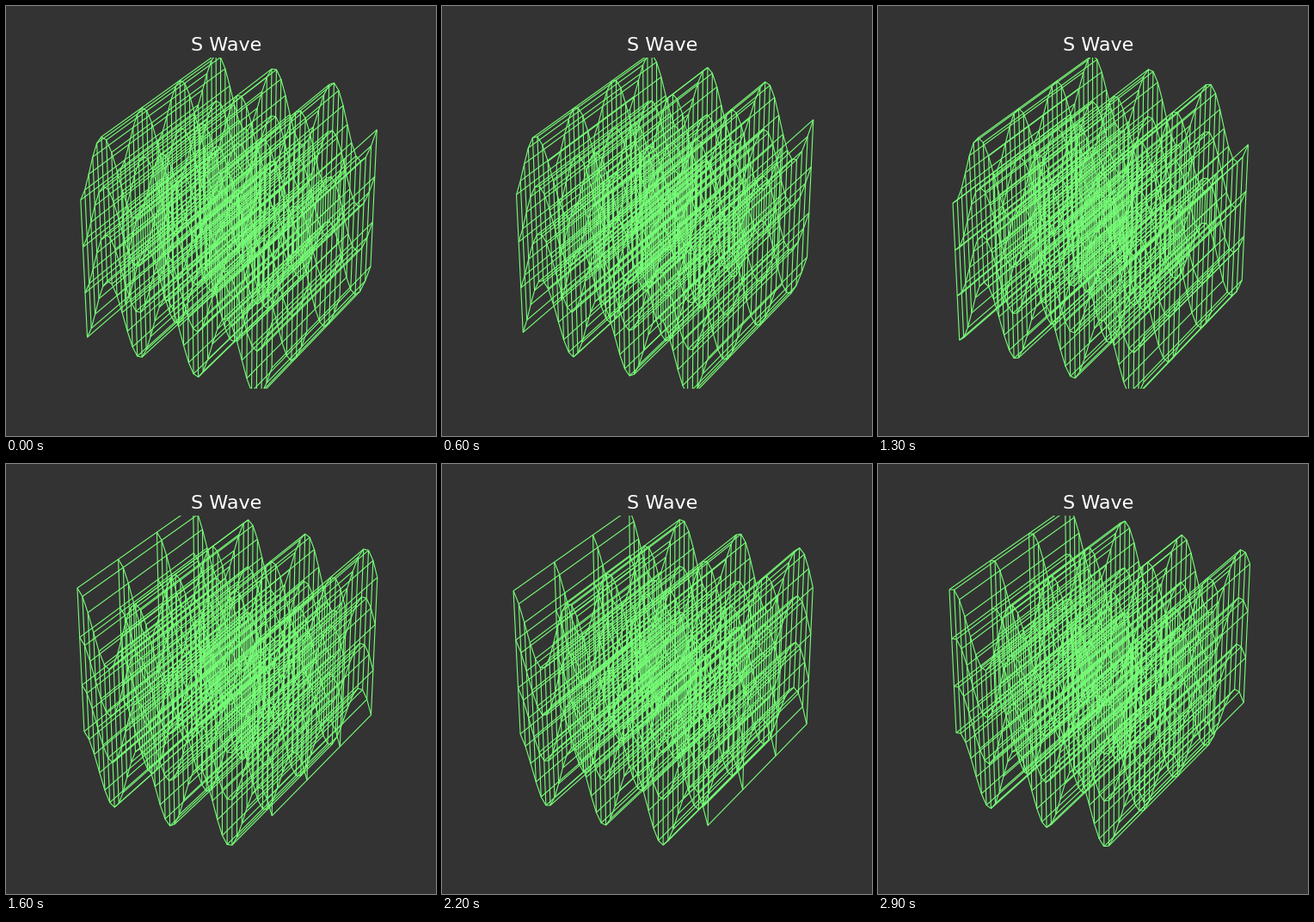
Write a matplotlib script that moves like this. It is 500 px wide and 500 px high and loops after 3000 ms.

```python
import numpy as np
import matplotlib.pyplot as plt
from matplotlib.animation import FuncAnimation
from mpl_toolkits.mplot3d.art3d import Line3DCollection

BACKGROUND = "#333333"
GREEN = "#77ff77"
FRAMES = 30
AMPLITUDE = 0.25

# Lattice at rest: the wave runs along x and shakes every point along z
x = np.linspace(-20, 0, 40)
layers = np.linspace(0, 1, 4)

fig = plt.figure(figsize=(5, 5), dpi=100, facecolor=BACKGROUND)
ax = fig.add_subplot(projection="3d", facecolor=BACKGROUND)
ax.set(xlim=(-20, 0), ylim=(0, 1), zlim=(0, 1))
ax.view_init(elev=30, azim=-60)
ax.set_axis_off()
ax.set_title("S Wave", color="white", fontsize=16, fontfamily="DejaVu Sans")


def rows(lift):
    """Wavy lines along x, one per (y, z) pair."""
    return [np.column_stack([x, np.full_like(x, y), z + lift])
            for y in layers for z in layers]


def struts(lift):
    """Straight lines along y and z at every x."""
    lines = []
    for px, dz in zip(x, lift):
        for s in layers:
            lines.append(np.array([(px, 0, s + dz), (px, 1, s + dz)]))
            lines.append(np.array([(px, s, dz), (px, s, 1 + dz)]))
    return lines


def add_lines(segments):
    lines = Line3DCollection(segments, colors=GREEN, linewidths=0.8)
    return ax.add_collection3d(lines) or lines


rest = np.zeros_like(x)
waves = add_lines(rows(rest))
frame_lines = add_lines(struts(rest))


def update(frame):
    lift = AMPLITUDE * np.sin(x - frame)
    waves.set_segments(rows(lift))
    frame_lines.set_segments(struts(lift))
    return waves, frame_lines


anim = FuncAnimation(fig, update, frames=FRAMES, interval=100,
                     repeat=True, repeat_delay=0, blit=False)
plt.show()
```
